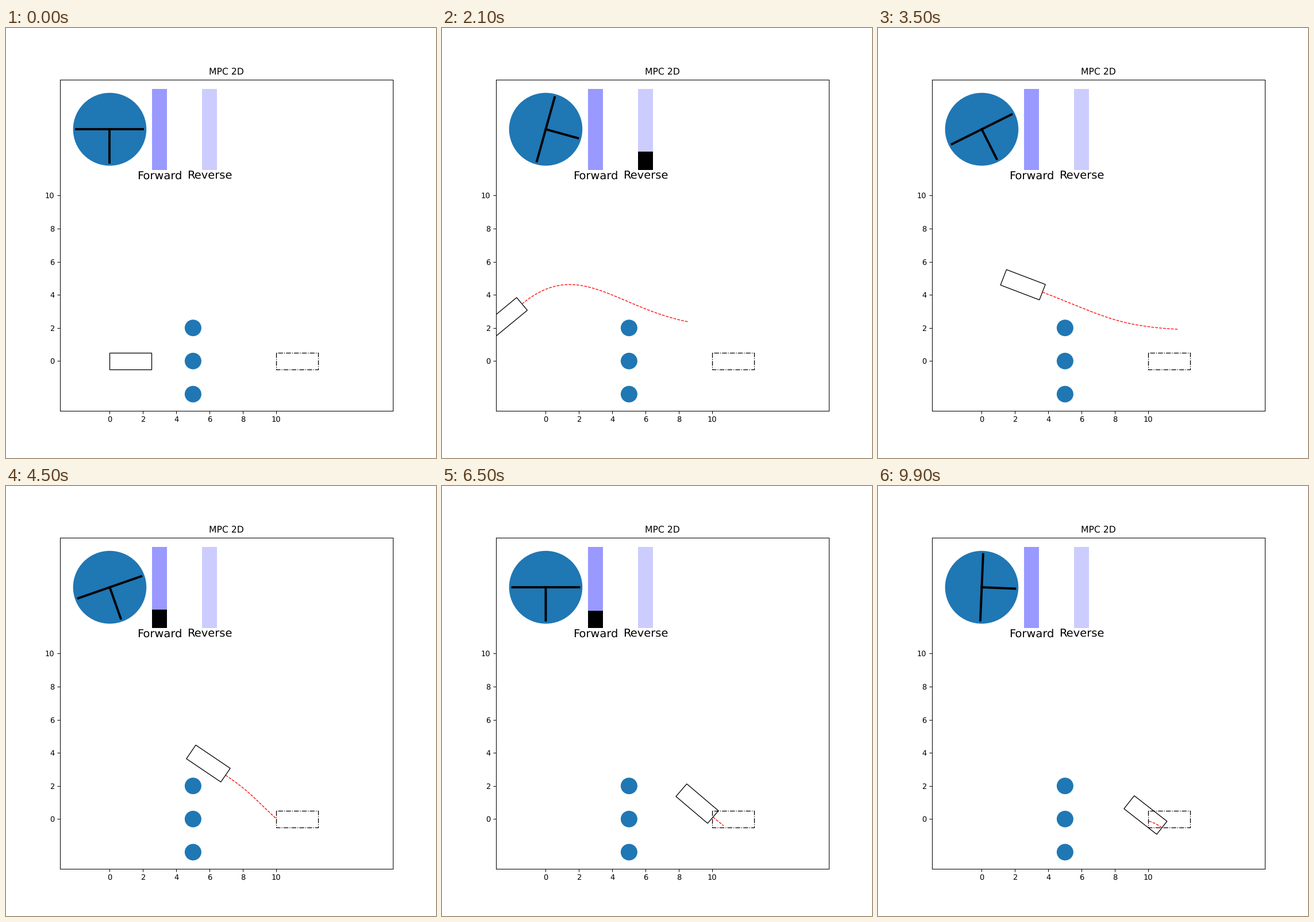
These frames come from a looping animation (748 by 748 pixels, 10000 ms). A matplotlib script:

```python
import numpy as np
import matplotlib.pyplot as plt
from matplotlib.animation import FuncAnimation
from matplotlib.patches import Circle, Rectangle

FRAMES, INTERVAL = 100, 100
CAR_W, CAR_L = 1.0, 2.5
HUB = (0, 14)
PEDAL_Y = 12

# Opening move: short straight reverse, then a tight arc.
TURN_END, RADIUS, STRAIGHT = 21, 1.95, 0.18
TURN = np.radians(140.3)

# Waypoints of the car: step, x, y, direction of travel (deg)
ROUTE = np.array([
    (21, -1.43, 3.45, 39.7),
    (35, 3.64, 4.16, -21),
    (45, 6.95, 2.65, -34.2),
    (65, 10.04, 0.12, -40.5),
    (87, 10.85, -0.58, -39.5),
    (99, 10.81, -0.53, -38.2),
])
# Where the forecast ends: step, x, y, direction (deg)
AIM = np.array([
    (1, 0.2, 3.9, 30),
    (21, 8.55, 2.37, -11),
    (35, 11.75, 1.92, -3),
    (39, 12.3, 1.6, -8),
    (44, 10, 0, -43),
    (65, 10.68, -0.41, -40),
    (77, 9.96, -0.1, -20),
])


def track(table, k):
    return [np.interp(k, table[:, 0], col) for col in table.T[1:]]


def unit(deg):
    a = np.radians(deg)
    return np.array([np.cos(a), np.sin(a)])


def bezier(p0, p1, p2, p3, t):
    u = 1 - t
    return u**3 * p0 + 3 * u**2 * t * p1 + 3 * u * t**2 * p2 + t**3 * p3


def velocity(row):
    """Steady cruise, then slowing to a stop at the goal."""
    return 0.38 * np.clip((87 - row[0]) / 42, 0, 1) ** 2 * unit(row[3])


def pose(k):
    """Rear axle position and direction of travel at step k."""
    if k <= TURN_END:
        s = (STRAIGHT + RADIUS * TURN) * (k / TURN_END) ** 1.66
        turn = max(0, s - STRAIGHT) / RADIUS
        pos = np.array([-min(s, STRAIGHT) - RADIUS * np.sin(turn),
                        RADIUS * (1 - np.cos(turn))])
        return pos, 180 - np.degrees(turn)
    i = np.searchsorted(ROUTE[:, 0], k)
    a, b = ROUTE[i - 1], ROUTE[i]
    span = b[0] - a[0]
    start, end = a[1:3], b[1:3]
    pos = bezier(start, start + velocity(a) * span / 3,
                 end - velocity(b) * span / 3, end, (k - a[0]) / span)
    return pos, track(ROUTE, k)[2]


def forecast(k, pos, course):
    x, y, end_dir = track(AIM, k)
    end = np.array([x, y])
    # The handles flip when the aim lies behind the car.
    reach = 0.44 * np.hypot(*(end - pos)) * np.sign(x - pos[0])
    return bezier(pos, pos + reach * unit(course), end - reach * unit(end_dir),
                  end, np.linspace(0, 1, 41)[:, None]).T


def steering(k):
    """Steering wheel angle in degrees."""
    if k <= 20:
        return 91.7 * min(k, 1)
    if k < 34:
        return 74.5 * (k - 20) ** -0.38
    if k <= 44:
        return 28 * abs(np.cos(np.pi * (k - 34) / 10))
    if k < 80:
        return 28 * np.exp((44 - k) / 2.7)
    t = np.clip((k - 86) / 8, 0, 1)
    return 87.6 * t * t * (3 - 2 * t)


def force(k):
    """Pedal force, positive forward and negative in reverse."""
    if 0 < k < 34:
        return -min(0.4, 0.19 * (34 - k) / 13)
    if 44 <= k < 86:
        return 0.19 - 0.0029 * (k - 45)
    return 0


def place(rect, pos, heading):
    """Put the middle of the rear edge at pos."""
    rect.set_xy(pos + CAR_W / 2 * unit(heading + 90))
    rect.angle = heading - 90


plt.rcParams["text.hinting"] = "none"
fig = plt.figure(figsize=(8, 8), dpi=93.5)
ax = fig.add_subplot()
ax.set(xlim=(-3, 17), ylim=(-3, 17), title="MPC 2D",
       xticks=range(0, 11, 2), yticks=range(0, 11, 2))

car = Rectangle((0, 0), CAR_W, CAR_L, fill=False)
goal = Rectangle((0, 0), CAR_W, CAR_L, fill=False, ls="dashdot")
place(goal, np.array([10, 0]), 0)
ax.add_patch(car)
ax.add_patch(goal)
path, = ax.plot([], [], "r--", lw=1)

ax.add_patch(Circle(HUB, 2.2))
for y in (-2, 0, 2):
    ax.add_patch(Circle((5, y), 0.5))
bar, = ax.plot([], [], "k", lw=3)
stem, = ax.plot([], [], "k", lw=3)


def pedal(x, label, alpha):
    ax.plot([x, x], [PEDAL_Y, 16], "b", lw=20, alpha=alpha)
    ax.text(x, 11, label, fontsize=15, ha="center")
    return ax.plot([], [], "k", lw=20)[0]


forward = pedal(3, "Forward", 0.4)
reverse = pedal(6, "Reverse", 0.2)


def press(line, x, amount):
    if amount > 0:
        line.set_data([x, x], [PEDAL_Y, PEDAL_Y + amount])
    else:
        line.set_data([], [])


def update(k):
    pos, course = pose(k)
    place(car, pos, course - 180)
    path.set_data(*(forecast(k, pos, course) if k else ([], [])))

    angle = steering(k)
    side, down = 2 * unit(angle), 2 * unit(angle - 90)
    bar.set_data(*np.transpose([HUB - side, HUB + side]))
    stem.set_data(*np.transpose([HUB, HUB + down]))

    push = force(k)
    press(forward, 3, push)
    press(reverse, 6, -push)
    return car, path, bar, stem, forward, reverse


anim = FuncAnimation(fig, update, frames=FRAMES, interval=INTERVAL,
                     repeat=True, repeat_delay=0)
plt.show()
```
